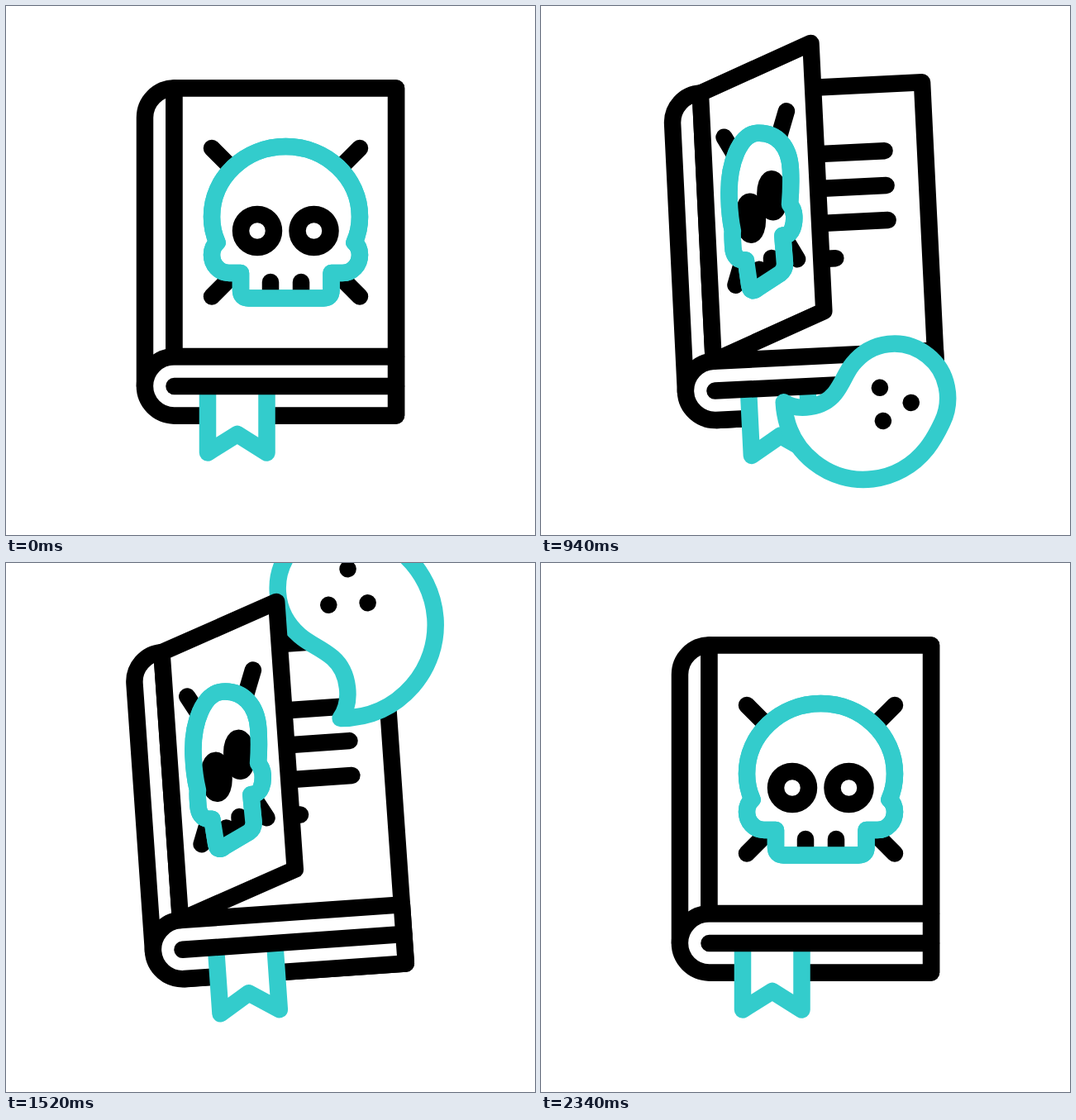
Animation of 640x640 px, one loop 2.4 s. Source, as an HTML page:

```html
<!DOCTYPE html>
<html lang="en">
<head>
<meta charset="utf-8">
<title>Spell book</title>
<style>
  html, body { margin: 0; height: 100%; overflow: hidden; background: #fff; }
  svg { display: block; }
  path {
    fill: none; stroke: #000; stroke-width: 20.5;
    stroke-linecap: round; stroke-linejoin: round;
    vector-effect: non-scaling-stroke;
  }
  .paper { fill: #fff; }
  .teal { stroke: #33cccc; }
  .butt { stroke-linecap: butt; }
</style>
</head>
<body>
<svg width="640" height="640">
  <g class="book">
    <path class="paper" d="M203.5 99.5H472V495.5H203.5z"/>
    <path d="M270 180H422.5M270 222H422.5M270 264H422.5M270 307H357"/>
    <path class="paper" d="M203.5 424V99.5A35.5 35.5 0 0 0 168 135V460"/>
    <path class="paper" d="M472 424.2H203.5A35.6 35.6 0 0 0 203.5 495.4H472z"/>
    <path class="paper teal butt" d="M244 460V540.5L279.8 518L315.5 540.5V460"/>
    <path d="M203.5 460H472"/>
  </g>
  <g id="ghost">
    <path class="paper teal" d="M-109 68C-85 66-60 40-60 13C-60-5-66-18-66-35C-66-78-33-111 10-111C47-111 77-84 85-50C89-33 91-22 91-7C91 58 40 108-22 108C-56 108-86 94-109 68z"/>
    <path d="M-15-33h.01M33-44h.01M18 1h.01"/>
  </g>
  <g class="book" id="cover"></g>
</svg>
<script>
const LOOP = 2400;
const skullShut = 'M255.5 286C251 276 249 266 249 255C249 208 289 170 338.5 170C388 170 428 208 428 255C428 266 426 276 421.5 286C426 290 428 295 428 301C428 313 419 323 407 323L393.5 323L393.5 344Q393.5 353.5 384 353.5L293.5 353.5Q284 353.5 284 344L284 323L270 323C258 323 249 313 249 301C249 295 251 290 255.5 286z';
const skullOpen = 'M233.7 267.5C232 256 231 243 231.5 227C232 185 248 150.5 268 150.5C291 150.5 304.4 168 304.4 195C304.4 213 303 226 301.5 238C304 241 306 247 306 252C306 264 302 273 296 274.5L291.5 275L292.5 309Q292.5 317 286 321.5L261 337.5Q252 345 250.5 335L247.5 303.5L243 303C237 302 233.3 296 233.3 287C233.3 280 233 272 233.7 267.5z';

// Cover parts, back to front: class, closed shape, open shape
const parts = [
  ['paper', 'M203.5 99.5L472 99.5L472 424L203.5 424z', 'M203.5 99.5L336 44L336 368.5L203.5 424z'],
  ['', 'M249 172L428 351.5M428 172L249 351.5', 'M229 153.5L307.3 304.5M302.8 125L234.3 333'],
  ['paper teal', skullShut, skullOpen],
  ['', 'M284 272a20 20 0 1 1 40 0a20 20 0 1 1 -40 0z', 'M247.3 253a8 20 0 1 1 16 0a8 20 0 1 1 -16 0z'],
  ['', 'M352.5 272a20 20 0 1 1 40 0a20 20 0 1 1 -40 0z', 'M273.7 226a8 20 0 1 1 16 0a8 20 0 1 1 -16 0z'],
  ['', 'M320 334L320 350M357 334L357 350', 'M262.5 315.4L262.5 327M277.5 302L277.5 319'],
  ['teal', skullShut, skullOpen],
].map(([cls, shut, open]) => {
  const el = document.createElementNS('http://www.w3.org/2000/svg', 'path');
  el.setAttribute('class', cls);
  document.getElementById('cover').append(el);
  return { el, shut, open: open.match(/-?[\d.]+/g).map(Number) };
});
const books = document.querySelectorAll('.book');
const ghost = document.getElementById('ghost');

// time, angle
const swing = [[400, 0], [760, -15.6], [1080, 5.8], [1440, -5.2], [1760, 2.4], [2120, 0]];
// time, x, y, angle, scale
const flight = [
  [480, 290, 330, 104, 0], [560, 320, 385, 98, 0], [700, 367, 456.5, 72, .39],
  [1040, 418, 487, 24, 1], [1160, 453, 395, 0, 1], [1360, 453, 195, -43, 1],
  [1700, 386, -83.5, -48, 1], [1900, 340, -260, -48, 1], [2000, 315, -350, -48, 1],
];

const clamp = v => Math.min(1, Math.max(0, v));
const smooth = u => u * u * (3 - 2 * u);

// cubic-bezier(.8, 0, .2, 1)
function ease(x) {
  let lo = 0, hi = 1;
  for (let i = 0; i < 24; i++) {
    const s = (lo + hi) / 2, r = 1 - s;
    if (2.4 * r * r * s + .6 * r * s * s + s ** 3 < x) lo = s; else hi = s;
  }
  return smooth(lo);
}

function swingAt(t) {
  return swing.reduce((angle, [time, value], i) => {
    if (!i) return value;
    const [t0, v0] = swing[i - 1];
    return t > t0 ? v0 + (value - v0) * smooth(clamp((t - t0) / (time - t0))) : angle;
  }, 0);
}

// Smooth curve through the flight keys
function flightAt(t) {
  let i = 1;
  while (i < flight.length - 3 && t > flight[i + 1][0]) i++;
  const [a, b, c, d] = flight.slice(i - 1, i + 3);
  const span = c[0] - b[0], u = (t - b[0]) / span;
  return [1, 2, 3, 4].map(k => {
    const v0 = (c[k] - a[k]) / (c[0] - a[0]) * span;
    const v1 = (d[k] - b[k]) / (d[0] - b[0]) * span;
    const h = smooth(u);
    return b[k] * (1 - h) + c[k] * h + v0 * u * (1 - u) ** 2 - v1 * u * u * (1 - u);
  });
}

function draw() {
  const t = performance.now() % LOOP;

  const openness = ease(clamp(Math.min(t, 2350 - t) / 1180));
  for (const { el, shut, open } of parts) {
    let n = 0;
    // Number() keeps arc flags as plain 0 and 1
    el.setAttribute('d', shut.replace(/-?[\d.]+/g, v => Number((+v + (open[n++] - v) * openness).toFixed(2))));
  }

  const turn = `rotate(${swingAt(t)} 320 320)`;
  books.forEach(book => book.setAttribute('transform', turn));

  const flying = t > 570 && t < 1900;
  ghost.style.display = flying ? '' : 'none';
  if (flying) {
    const [x, y, angle, scale] = flightAt(t);
    ghost.setAttribute('transform', `translate(${x} ${y}) rotate(${angle}) scale(${clamp(scale)})`);
  }
  requestAnimationFrame(draw);
}
draw();
</script>
</body>
</html>
```
